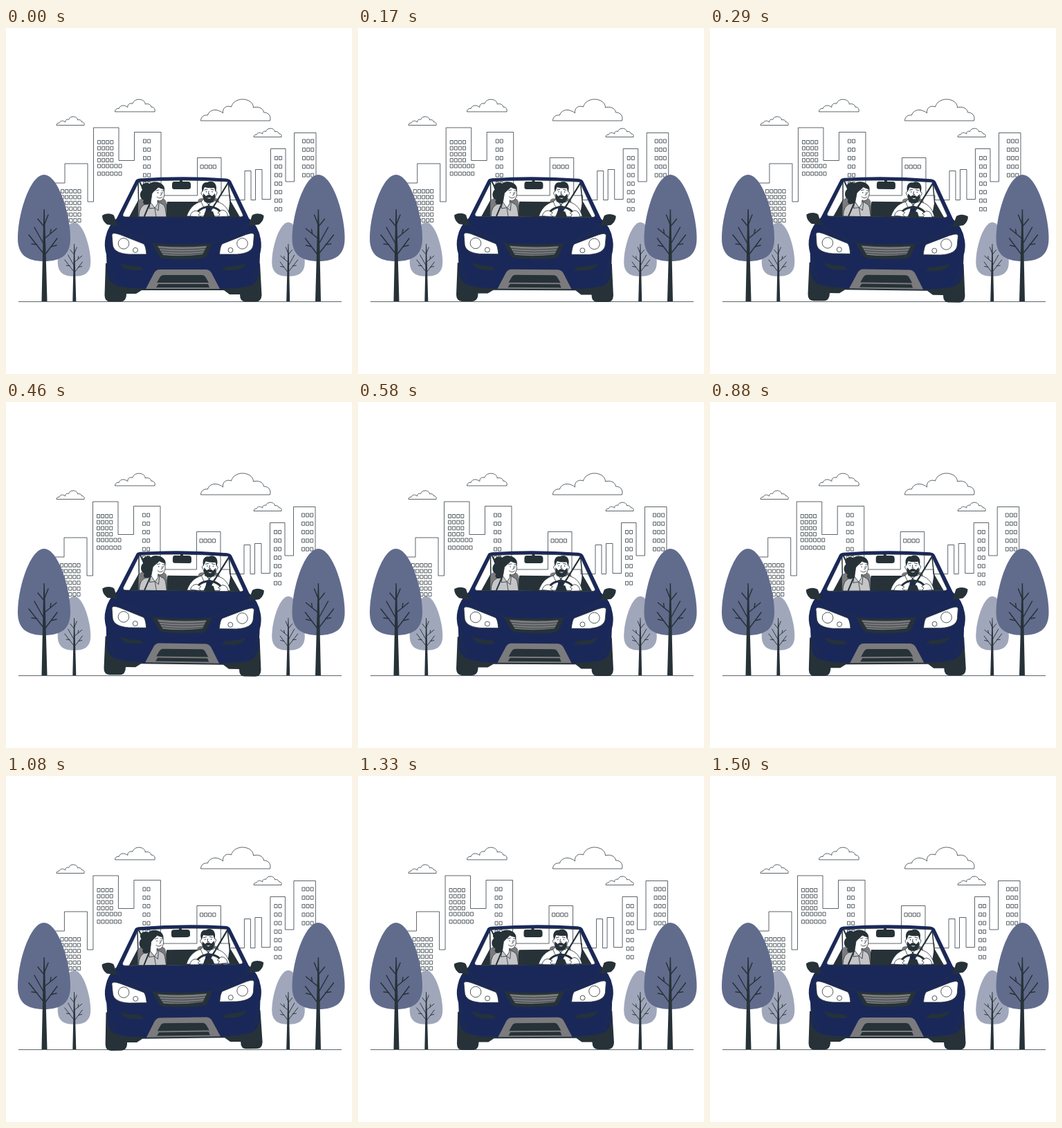
These frames come from a looping animation (500 by 500 pixels, 1.54 s). An HTML page:

```html
<!DOCTYPE html>
<html lang="en">
<head>
<meta charset="utf-8">
<title>Drive through town</title>
<style>
  html, body { margin: 0; width: 100%; height: 100%; overflow: hidden; background: #fff; }
  svg { display: block; width: 100vw; height: 100vh; }
  .line { fill: none; stroke: #263238; stroke-width: .75; }
  .ink { fill: #263238; }
  .navy { fill: #1a2859; }
  .grey { fill: #7b7b7d; }
  .pale { fill: #fff; stroke: #263238; stroke-width: .8; }
  .stroke { fill: none; stroke: #263238; stroke-linecap: round; stroke-linejoin: round; }
</style>
</head>
<body>
<svg viewBox="0 0 500 500">
  <defs>
    <path id="cloud" vector-effect="non-scaling-stroke" d="M0 0C0-5 4-9 10-8C11-14 20-18 27-14C30-13 31-12 32-11C31-18 37-23 44-20C46-27 53-31 60-31C69-31 76-26 76-19C82-21 90-19 91-12C97-12 102-8 100 0Z"/>
    <path id="crown" d="M0-183C20-183 38-127 38-91C38-68 26-58 0-58C-26-58-38-68-38-91C-38-127-20-183 0-183Z"/>
    <g id="trunk">
      <path class="ink" d="M-3.5 0L-.6-133H.8L4.5 0Z"/>
      <path class="stroke" stroke-width="1.5" d="M0-68L-22-96M-10-82L-18-83M0-82L-14-107M1-67L19-91M10-79L18-81M1-91L18-105M9-98L10-104M0-108L-9-119M0-110L6-125"/>
    </g>
    <g id="half">
      <path class="ink" d="M139 271C145 267 153 268 156 271L161 286L146 284C141 280 139 276 139 271Z"/>
      <path class="pale" d="M153 299C154 295 160 297 166 299L199 312Q202 315 203 327H178C164 326 154 322 154 311Z"/>
      <circle class="pale" cx="170" cy="311.5" r="7.8"/>
      <circle class="pale" cx="187" cy="321" r="3.5"/>
      <path class="ink" d="M165 340Q174 344 194 345L199 350H181Q168 348 165 340Z"/>
      <path class="stroke" stroke-width=".6" d="M162 283Q164 292 179 298T214 311M148 333Q150 356 157 366"/>
    </g>
  </defs>

  <g class="line" id="clouds"></g>
  <g id="city" class="line">
    <path d="M46 290V224H85V196H118V251H126.5V144H163V191.5H185.5V150.5H224V242H276.5V187.5H311V242H324V248.5H345V206.5H354V248.5H360.5V204.5H370V247.5H382.5V174.5H404V222H416.5V151.5H448V290"/>
    <path id="panes"/>
  </g>
  <path class="line" d="M18 395.5H485"/>

  <g id="car">
    <path class="ink" d="M144 340H367L369.5 386Q369 395.5 361 395.5H346Q338 395.5 338 385H323L315 379H196L188 384H174Q174 395.5 165 395.5H151Q142.5 395.5 142.5 386Z"/>

    <path class="ink" d="M178 273L191 249H194V273Z"/>
    <path class="ink" d="M228 273L233 251H282V273ZM320 273L324 249L338 273Z"/>
    <path class="stroke" stroke-width="1.5" d="M191 222L192 272M321 222L326 272"/>
    <path class="grey" d="M191 273V252Q192 246 199 246H224Q231 246 232 253V273Z"/>
    <path class="grey" d="M277 262V250Q278 246 283 246H302Q308 246 308 251V262Z"/>

    <path fill="#c5c5c7" stroke="#263238" stroke-width=".8" d="M192 273Q192 257 203 254L211 251H218Q229 254 230 260L232 273Z"/>
    <g id="her">
      <path class="ink" d="M208 225C212 220 227 222 229 231C230 238 226 242 224 247L207 254C201 258 196 253 199 249C192 246 193 237 197 234C193 228 199 221 208 225Z"/>
      <path class="pale" d="M211 239C214 235 218 233 220 230C224 232 226 232 228 233L229 240Q228 249 222 250L219 249V254L215 260L209 252Z"/>
      <path class="stroke" stroke-width=".8" d="M217 235L221 234M225 235L228 235M224 238L225 241L223 241.5M218 244Q222 248 226 244"/>
      <path class="stroke" stroke-width="1.4" d="M219.5 238V238.2M226 238V238.2"/>
    </g>
    <path class="stroke" stroke-width=".8" d="M208 253L207 261L215 260L220 264L221 253M215 261L217 273"/>
    <path class="stroke" stroke-width="2" d="M193 222L208 253L200 272"/>

    <path class="pale" d="M261 272C266 257 276 251 287 250H300C313 252 320 258 324 272Z"/>
    <path class="navy" d="M290 254H296L298 273H287Z"/>
    <path class="pale" d="M286 247L293 256L286 260L282 251ZM300 247L293 256L300 260L304 251Z"/>
    <g id="him">
      <path class="pale" d="M285 229H302L303 236Q307 237 303 242L301 251H287L284 242Q280 238 284 236Z"/>
      <path class="ink" d="M284 237C281 228 285 222 291 223C298 219 307 224 303 237L301 231Q293 232 287 230Z"/>
      <path class="ink" d="M285 239L289 243Q293 239 298 243L302 239C303 249 300 253 293 253C287 253 284 247 285 239Z"/>
      <path class="pale" stroke-width=".4" d="M290 245H297Q294 249 290 245Z"/>
      <path class="stroke" stroke-width=".9" d="M287 234L291 233M296 233L300 234M293 236L292.5 240H294.5"/>
      <path class="stroke" stroke-width="1.4" d="M289.5 236.5V236.7M298 236.5V236.7"/>
    </g>
    <path class="stroke" stroke-width="2.2" d="M322 222L303 253L290 272"/>
    <g id="wheel">
      <path class="stroke" stroke-width="3" d="M274 274A19.5 15.5 0 0 1 313 274"/>
      <path class="ink" d="M285 273L288 265H299L302 273Z"/>
      <path class="pale" d="M266 272Q268 264 275 264L281 267L278 270L281 273ZM321 272Q319 263 312 263L306 267L309 269L307 273Z"/>
    </g>

    <path class="ink" d="M251 216H255V222H263Q267 222 267 226V230Q267 233 263 233H243Q240 233 240 230V226Q240 222 243 222H251Z"/>
    <path class="navy" fill-rule="evenodd" d="M187 221Q188 218 193 217.500Q255 213 318 217.500Q323 218 325 221L351 275Q365 286 368 305Q370 315 367 327L366 354Q363 370 351 373Q330 377 308 377H203Q172 376 159 372Q148 368 146 353L145 327Q141 314 144 302Q147 286 160 275ZM192 222L169 269Q168 273 173 273H338Q344 273 342 269L320 222Q255 218 192 222Z"/>
    <path class="line" d="M192 222L169 269Q168 273 173 273H338Q344 273 342 269L320 222Q255 218 192 222Z"/>
    <use href="#half"/>
    <use href="#half" transform="matrix(-1 0 0 1 511.500 0)"/>

    <path class="ink" d="M211 311Q255 315 298 311L290 329Q287 333 280 333Q255 335 230 333Q224 333 221 329Z"/>
    <path class="grey" d="M219 315Q255 318 290 315L284 327Q255 331 227 328Z"/>
    <path class="stroke" stroke-width=".8" d="M221 318.500Q255 322 288 318.500M224 322Q255 325.500 286 322M226 325.500Q255 329 284 325.500"/>
    <path class="grey" d="M222 349H288Q294 349 297 354L309 377H202L214 354Q217 349 222 349Z"/>
    <path class="ink" d="M228 357H283Q287 357 289 361L293 368H218L222 361Q224 357 228 357ZM220 370H292L294 375H217Z"/>
  </g>

  <g id="trees"></g>
</svg>
<script>
const $ = id => document.getElementById(id);

$('clouds').innerHTML = [[73, 140.5, .4], [157.5, 121, .575], [281.5, 134, 1], [358, 157.5, .4]]
  .map(([x, y, k]) => `<use href="#cloud" transform="translate(${x} ${y}) scale(${k})"/>`).join('');

// first x, first y, columns, rows, row gap, width, height
const blocks = [
  [132.5, 162.5, 4, 4, 8.7, 4, 5],
  [132.5, 197, 6, 2, 11, 4, 5],
  [198.5, 161, 2, 6, 12.3, 4, 5],
  [79.5, 233.5, 5, 6, 8.4, 4.2, 5],
  [281, 198, 4, 1, 0, 4.2, 5],
  [388.5, 185.5, 2, 7, 12.3, 4, 5],
  [428.5, 161, 3, 5, 12.3, 4, 5]
];
let panes = '';
for (const [x, y, cols, rows, gap, w, h] of blocks)
  for (let r = 0; r < rows; r++)
    for (let c = 0; c < cols; c++)
      panes += `M${x + c * 6.1} ${y + r * gap}h${w}v${h}h${-w}z`;
$('panes').setAttribute('d', panes);

$('trees').innerHTML = [
  [98.5, .625, 1, '#a0a7ba'], [408, .625, -1, '#a0a7ba'],
  [55, 1, 1, '#616c8c'], [451.5, 1, -1, '#616c8c']
].map(([x, k, flip, fill]) =>
  `<g transform="translate(${x} 395) scale(${k * flip} ${k})"><use href="#crown" fill="${fill}"/><use href="#trunk"/></g>`
).join('');

const LOOP = 1540, STEPS = 37, STEP = LOOP / STEPS;
const sway = [[0, 0], [9, 1], [18, 0], [27, -1], [36, 0], [37, 0]];
const drift = [[0, 0], [6.3, 1], [14, -2], [17, -2], [25, -.6], [31, -.5], [36, 0], [37, 0]];

function at(keys, n) {
  const i = keys.findIndex(k => k[0] > n);
  const [a, from] = keys[i - 1], [b, to] = keys[i];
  return from + (to - from) * (1 - Math.cos(Math.PI * (n - a) / (b - a))) / 2;
}
const turn = (id, deg, x, y) => $(id).setAttribute('transform', `rotate(${deg} ${x} ${y})`);

function draw(now) {
  const n = Math.floor((now % LOOP + 3) / STEP) % STEPS;
  const s = at(sway, n);
  turn('car', .8 * s, 256, 303);
  turn('her', 1.8 * s, 214, 255);
  turn('him', 2 * s, 293, 254);
  turn('wheel', 2.5 * s, 293, 273);
  $('city').setAttribute('transform', `translate(${at(drift, n)} 0)`);
}
const start = performance.now();
function tick() {
  draw(performance.now() - start);
  requestAnimationFrame(tick);
}
tick();
</script>
</body>
</html>
```
